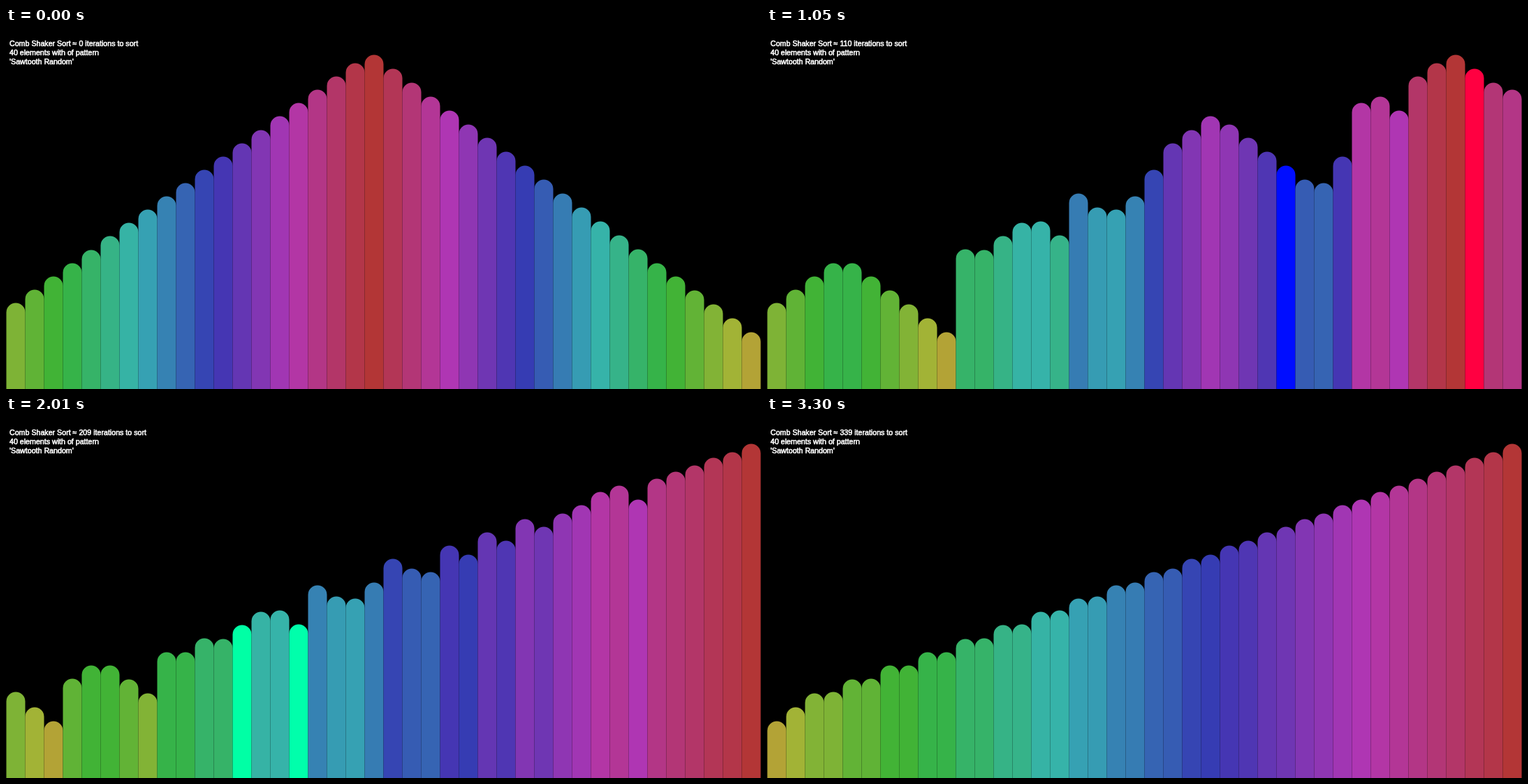
Animation of 1081x518 px, one loop 9 s. Source, as an HTML page with a canvas:

```html
<!DOCTYPE html>
<html>
<head>
<meta charset="utf-8">
<style>
  html, body { margin: 0; background: #000; overflow: hidden; }
  canvas { display: block; }
</style>
</head>
<body>
<canvas id="stage" width="1081" height="518"></canvas>
<script>
const ctx = document.getElementById('stage').getContext('2d');
const W = 1081, H = 518, COUNT = 40, BAR = 27, MAX = 466;
const LOOP = 9000, TICK = 30, COMPARES_PER_TICK = 3;

// Rising slope, then a slightly steeper falling one from the peak.
const bars = Array.from({ length: COUNT }, (_, i) =>
  i < 19 ? 110 + i * 19.11 : MAX - (i - 19) * 19.9);

// Comb sort whose passes alternate direction; records one step per comparison.
function recordSort(list) {
  const a = [...list], steps = [{ bars: [...a], pair: [], count: 0 }];
  let gap = COUNT, count = 0, forward = true, swapped = true;

  function compare(i) {
    const j = i + gap;
    steps.push({ bars: [...a], pair: [i, j], count: ++count });
    if (a[i] > a[j]) {
      [a[i], a[j]] = [a[j], a[i]];
      swapped = true;
    }
  }

  while (gap > 1 || swapped) {
    gap = Math.max(1, Math.floor(gap / 1.3));
    swapped = false;
    count++;
    if (forward) for (let i = 0; i < COUNT - gap; i++) compare(i);
    else for (let i = COUNT - gap; i > 0; i--) compare(i);
    forward = !forward;
  }
  steps.push({ bars: [...a], pair: [], count });
  return steps;
}

const steps = recordSort(bars);

function drawBar(value, i, active) {
  const x = 14 + i * BAR;
  const hue = 360 * value / MAX;
  ctx.strokeStyle = active ? `hsl(${hue}, 100%, 50%)` : `hsl(${hue}, 53.85%, 45.5%)`;
  ctx.beginPath();
  ctx.moveTo(x, H + BAR);
  ctx.lineTo(x, Math.round(H - value));
  ctx.stroke();
}

function drawLine(text, y) {
  ctx.strokeText(text, 5, y);
  ctx.fillText(text, 5, y);
}

function draw({ bars, pair, count }) {
  ctx.fillStyle = '#000';
  ctx.fillRect(0, 0, W, H);
  ctx.lineWidth = BAR;
  ctx.lineCap = 'round';
  bars.forEach((value, i) => drawBar(value, i, pair.includes(i)));

  ctx.font = '10.67px "Liberation Sans", Arial, sans-serif';
  ctx.fillStyle = ctx.strokeStyle = '#fff';
  ctx.lineWidth = 0.6;
  drawLine(`Comb Shaker Sort ≈ ${count} iterations to sort`, 26);
  drawLine(`${COUNT} elements with of pattern`, 39);
  drawLine("'Sawtooth Random'", 52);
}

const start = performance.now();
function frame() {
  const time = (performance.now() - start) % LOOP;
  const step = Math.floor(time / TICK) * COMPARES_PER_TICK;
  draw(steps[Math.min(step, steps.length - 1)]);
  requestAnimationFrame(frame);
}
frame();
</script>
</body>
</html>
```
